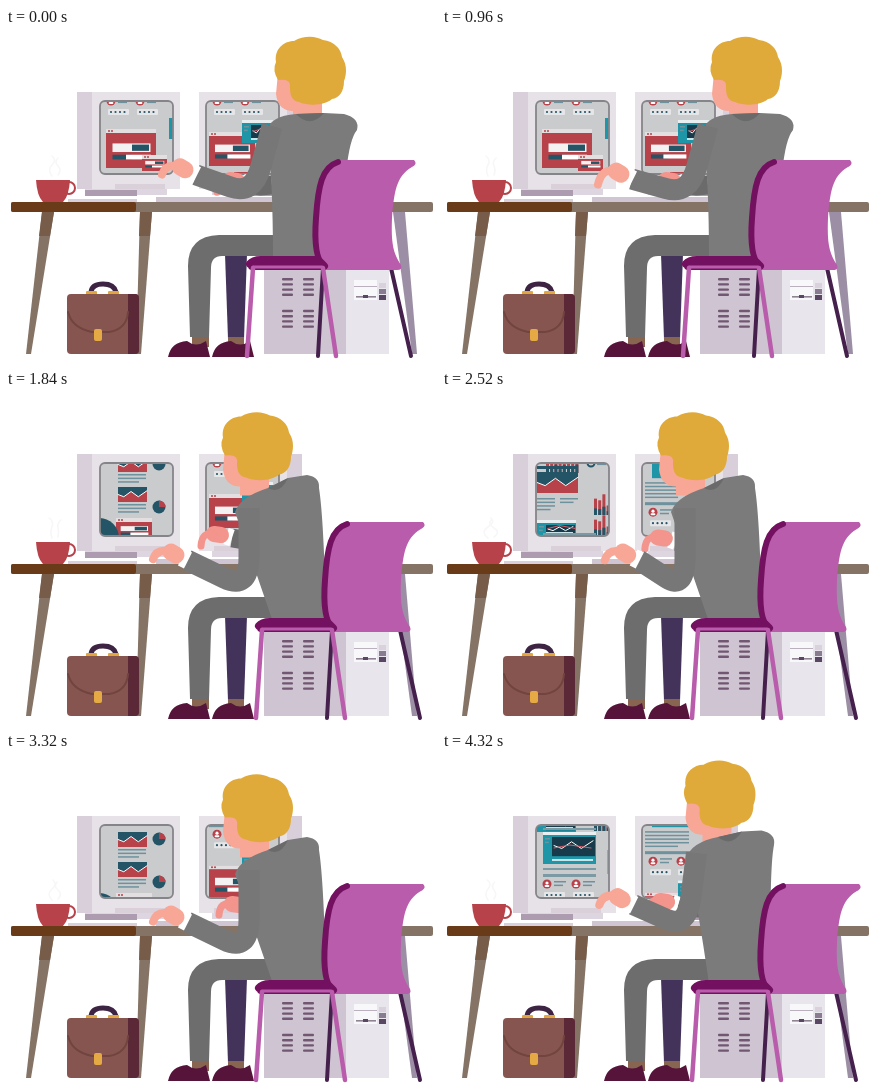
These frames come from a looping animation (430x334 px, 4.36 s). An HTML page:

```html
<!DOCTYPE html>
<html lang="en">
<head>
<meta charset="utf-8">
<title>Office worker</title>
<style>
html, body { margin: 0; width: 100%; height: 100%; overflow: hidden; background: #fff; }
svg { display: block; width: 100vw; height: 100vh; }
</style>
</head>
<body>
<svg id="stage" viewBox="0 0 430 334"></svg>
<script>
const LOOP = 4360, STEP = 40;
const LEFT_PAGE = 383, RIGHT_PAGE = 154;
const RED = '#b7424a', TEAL = '#1f96a8', NAVY = '#245567', SKIN = '#f8a696', FAR_SKIN = '#f3958c';
const PLUM = '#741060', ORCHID = '#b95cab', SUIT = '#777', WOOD = '#857465';

// ---- markup helpers ----
const rect = (x, y, w, h, fill, rx = 0) =>
  `<rect x="${x}" y="${y}" width="${w}" height="${h}" fill="${fill}" rx="${rx}"/>`;
const shape = (d, fill, id = '') => `<path id="${id}" d="${d}" fill="${fill}"/>`;
const line = (d, color, width, id = '', cap = 'round') =>
  `<path id="${id}" d="${d}" fill="none" stroke="${color}" stroke-width="${width}" stroke-linecap="${cap}" stroke-linejoin="round"/>`;
const disc = (x, y, r, fill) => `<circle cx="${x}" cy="${y}" r="${r}" fill="${fill}"/>`;
const hoop = (x, y, r, color) => `<circle cx="${x}" cy="${y}" r="${r}" fill="none" stroke="${color}" stroke-width="2"/>`;
const repeat = (n, fn) => Array.from({ length: n }, (_, i) => fn(i)).join('');
const below = (dy, content) => `<g transform="translate(0 ${dy})">${content}</g>`;
const mirrored = content => `<g transform="matrix(-1 0 0 1 367 0)">${content}</g>`;

// ---- screen widgets ----
const textLines = (x, y, w, n) => repeat(n, i => rect(x, y + i * 3.6, w - (i === n - 1 ? w / 4 : 0), 1.5, '#6e929d'));
const dots = (x, y) => rect(x - 3, y - 3, 21, 6, '#e6e6e8', 1) + repeat(4, i => disc(x + i * 4.5, y, 1.1, NAVY));
const avatar = (x, y) => disc(x, y, 4.5, RED) + disc(x, y - 1, 1.6, '#fff') +
  rect(x - 2.4, y + 1, 4.8, 2, '#fff', 1) + textLines(x + 7, y - 3, 12, 2);
const contact = (x, y) => avatar(x, y) + dots(x, y + 11);
const bars = (x, base, n) => repeat(n, i => {
  const h = 8 + 13 * Math.abs(Math.sin(i * 1.9 + .7));
  return rect(x + i * 4.2, base - h, 3, h, RED) + rect(x + i * 4.2, base - h * .4, 3, h * .4, NAVY);
});
const pie = (x, y, r) => disc(x, y, r, NAVY) + shape(`M${x} ${y}V${y - r}A${r} ${r} 0 0 1 ${x + r} ${y}Z`, RED);
const trend = (x, y, w, h) => `M${x} ${y + h * .5}l${w * .2} ${h * .15} ${w * .25} ${-h * .35} ${w * .25} ${h * .35} ${w * .3} ${-h * .4}`;
const chart = (x, y, w, h) => rect(x, y, w, h, NAVY) +
  shape(`${trend(x, y, w, h)}V${y + h}H${x}Z`, RED) + line(trend(x, y, w, h), '#fff', 1);
const darkWindow = (x, y, w, h) => rect(x, y, w, h, TEAL) + rect(x, y, w, 3, '#e9eef0') +
  rect(x + 9, y + 5, w - 10, h * .6, '#173b4a') + line(trend(x + 11, y + 4, w - 14, h * .6), '#fff', 1) +
  line(`M${x + 11} ${y + h * .5}l${w * .3} -3 ${w * .4} 3`, '#d95c68', 1) +
  textLines(x + 2, y + 6, 5, 2) + rect(x + 9, y + h - 5, w - 12, 2, '#c9e4e8');
const redWindow = (x, y, w, h) => rect(x, y, w, h, RED) + rect(x, y, w, 4, '#e3dfe1') +
  disc(x + 3, y + 2, 1, RED) + disc(x + 6, y + 2, 1, RED) +
  rect(x + w * .13, y + h * .37, w * .76, h * .22, '#f4f1f2') + rect(x + w * .52, y + h * .4, w * .34, h * .16, NAVY) +
  rect(x + w * .13, y + h * .66, w * .38, h * .12, NAVY) + rect(x + w * .4, y + h * .66, w * .5, h * .12, '#fff');
const ring = (x, y) => hoop(x, y, 3.5, NAVY) + textLines(x + 6, y - 3, 12, 2);

const report = y => chart(112, y, 29, 15) + pie(153, y + 7, 6.5) + textLines(112, y + 17, 28, 3);
const charts = report(80) + below(14, pie(153, 116, 6.5)) + chart(112, 110, 29, 15) +
  textLines(112, 127, 28, 3) + redWindow(110, 141, 36, 22) + disc(93, 161, 20, NAVY);
const statistics = disc(93, 75, 20, NAVY) + line('M93 75l14 14', RED, 2) + rect(118, 73, 49, 4, RED) + rect(118, 79, 49, 2, NAVY) +
  [123, 147].map(x => contact(x, 88) + dots(x, 107)).join('') +
  rect(119, 114, 48, 4, RED) + bars(104, 146, 8) + ring(149, 124) + ring(149, 136);
const article = rect(95, 76, 41, 3, NAVY) + chart(95, 82, 41, 21) + textLines(95, 108, 18, 4) +
  textLines(118, 108, 18, 2) + bars(152, 125, 4) + darkWindow(95, 130, 39, 17) + bars(152, 146, 4);
const dashboard = rect(101, 76, 53, 2, '#7b9aa4') + darkWindow(101, 80, 53, 32) + rect(165, 98, 3, 24, '#8badb5') +
  rect(101, 116, 53, 2, '#7b9aa4') + rect(101, 122, 53, 3, '#7b9aa4');
const forms = contact(105, 73) + contact(134, 73) + rect(163, 90, 4, 21, TEAL) +
  redWindow(100, 101, 50, 39) + redWindow(136, 127, 25, 16);

const leftPage = charts + below(120, statistics) + below(183, article) + below(250, dashboard) + below(309, forms);
const rightPage = contact(211, 0) + contact(239, 0) + redWindow(203, 31, 46, 34) + darkWindow(236, 19, 31, 23) +
  rect(228, 71, 30, 5, RED) + darkWindow(210, 82, 52, 38) + textLines(203, 124, 44, 5) + rect(203, 144, 52, 3, '#6e929d');

// ---- furniture ----
const screen = (id, page, height) => `<g clip-path="url(#${id}Glass)"><g id="${id}">${page}${below(height, page)}</g></g>`;
const glass = (id, x) => `<clipPath id="${id}Glass">${rect(x, 73, 73, 73, '#000', 5)}</clipPath>`;
const monitorBody = rect(71, 64, 103, 97, '#e7e2e8') + rect(71, 64, 15, 97, '#d9cfdb') +
  rect(79, 161, 82, 6, '#ddd5df') + rect(79, 162, 52, 6, '#ad9cb0') + rect(109, 156, 50, 5, '#d9d0da') +
  rect(94, 73, 73, 73, '#cacbcd', 5);
const bezel = `<rect x="94" y="73" width="73" height="73" rx="5" fill="none" stroke="#858589" stroke-width="1.8"/>`;
const monitors = monitorBody + mirrored(monitorBody) +
  screen('left', leftPage, LEFT_PAGE) + screen('right', rightPage, RIGHT_PAGE) + bezel + mirrored(bezel);

const vents = repeat(16, i => rect(276 + i % 2 * 21, 250 + (i >> 1) * 5.2 + (i > 7 ? 11 : 0), 11, 2.4, '#725772', 1));
const tower = rect(258, 240, 83, 86, '#cfc4d1') + rect(340, 240, 43, 86, '#e9e5ec') + vents +
  rect(348, 252, 23, 20, '#f8f7f9') + rect(348, 258, 23, 1, '#bbb1be') + rect(350, 268, 20, 1.6, '#8f8393') +
  rect(357, 267, 5, 3, '#594662') + repeat(3, i => rect(373, 255 + i * 6, 7, 5, ['#d9d1dc', '#8a7c90', '#594662'][i]));

const deskLeg = (x, foot, color) => shape(`M${x} 184H${x + 12}L${foot + 5} 326H${foot}Z`, color);
const desk = deskLeg(36, 20, WOOD) + deskLeg(134, 130, WOOD) + deskLeg(387, 406, '#9c8fa5') +
  shape('M36 184H48L44 208H33Z', '#765c49') + shape('M134 184H146L144 208H133Z', '#765c49') +
  rect(5, 174, 422, 10, WOOD, 2) + rect(5, 174, 125, 10, '#6a3b19', 2) +
  rect(62, 171, 69, 3, '#d8d0dc') + rect(150, 169, 116, 5, '#d0c5d3');

const briefcase = line('M85 264Q86 256 97 256T110 264', '#3e2443', 5) +
  rect(80, 263, 11, 4, '#e2a640', 1) + rect(102, 263, 11, 4, '#e2a640', 1) +
  rect(61, 266, 72, 60, '#875550', 4) + shape('M122 266H129Q133 266 133 270V322Q133 326 129 326H122Z', '#5b2838') +
  line('M62 284Q66 300 86 304H103Q121 301 122 284', '#71443f', 2) + rect(88, 301, 8, 12, '#e5aa43', 2);

const cup = hoop(63, 160, 6, RED) + shape('M30 152H64Q63 168 57 174H37Q31 168 30 152Z', RED) + line('', '#f7f7f7', 1.6, 'steam');

const shoe = x => shape(`M${x} 329Q${x + 3} 314 ${x + 19} 313Q${x + 28} 320 ${x + 38} 313L${x + 42} 329Z`, '#57143a');
const legs = shape('M219 226H241L238 311H222Z', '#43335a') + rect(222, 309, 16, 12, '#876551') +
  rect(186, 307, 17, 12, '#876551') +
  shape('M270 207H213Q182 208 182 238L184 309H203L205 240Q205 228 216 228H270Z', '#6d6d6d') + shoe(162) + shoe(206);

const head = shape('M272 45L270 66Q272 83 287 83V92H316V60Z', SKIN) +
  shape('M272 52Q266 42 270 34C268 22 277 13 288 13C298 7 310 8 317 12C328 13 335 21 336 29C342 38 340 48 338 53C338 64 333 70 326 71C318 78 302 78 293 74Q284 73 284 60Q286 50 272 52Z', '#dfaa3a');

const seat = `<g id="seat">` +
  shape('M331 132H408Q412 136 406 139C390 148 388 165 386 190C385 215 387 225 395 237Q397 242 391 242H318C306 232 308 165 316 147Q321 134 331 132Z', ORCHID) +
  line('M332 134C316 139 312 158 310 190Q307 229 318 239', PLUM, 6) +
  line('M244 236Q247 232 255 232H312L318 238H246', PLUM, 8) + line('M247 239H316', ORCHID, 3) + `</g>`;

document.getElementById('stage').innerHTML =
  `<defs>${glass('left', 94)}${glass('right', 200)}</defs>` + rect(0, 0, 430, 334, '#fff') +
  monitors + desk + tower + briefcase + cup +
  line('', '#6b6b6b', 19, 'farSleeve', 'butt') + line('', '#fff', 17, 'farCuff', 'butt') +
  line('', FAR_SKIN, 16, 'farPalm') + line('', FAR_SKIN, 7, 'farFinger') +
  legs + line('', '#46204d', 4, 'backLegs') +
  `<g id="head">${head}</g>` + shape('', '#7b7b7b', 'torso') + shape('', '#6a6a6a', 'collar') +
  line('', SUIT, 21, 'sleeve', 'butt') + line('', '#fff', 18, 'cuff', 'butt') +
  line('', SKIN, 17, 'palm') + line('', SKIN, 8, 'finger') +
  seat + line('', ORCHID, 4.5, 'frontLegs');

// ---- motion ----
const $ = id => document.getElementById(id);
const set = (id, d) => $(id).setAttribute('d', d);
const move = (id, x, y) => $(id).setAttribute('transform', `translate(${x} ${y})`);
const poly = (...pts) => 'M' + pts.map(p => p.join(' ')).join('L');
const ramp = (t, from, to) => Math.min(1, Math.max(0, (t - from) / (to - from)));
const smooth = u => u * u * (3 - 2 * u);
const between = (a, b, u) => [a[0] + (b[0] - a[0]) * u, a[1] + (b[1] - a[1]) * u];
const arch = u => Math.sin(Math.PI * u);
const swing = (t, period) => -Math.cos(2 * Math.PI * (t - 1840) / period);

function drawScreens(t) {
  move('left', 0, -((309 + .25 * Math.max(0, t - 1492)) % LEFT_PAGE));
  move('right', 0, -((RIGHT_PAGE - 73 + .435 * Math.max(0, t - 1925)) % RIGHT_PAGE));
}

function drawBody(lean, lift, t) {
  const joint = (x, y, dx, dy) => [x + dx * lean, y + dy * lean - lift];
  const shoulder = joint(261, 103, -32, 19), nape = joint(290, 86, -28, 12);
  const collar = joint(318, 85, -36, 3), outer = joint(351, 102, -38, -4);
  move('head', -53 * lean, 13.5 * lean - lift);
  set('torso', `M267 232Q${joint(267, 150, -23, 15)} ${shoulder}Q${joint(264, 88, -30, 19)} ${nape}L${collar}` +
    `L${joint(338, 86, -37, -1)}Q${joint(354, 90, -40, -3)} ${outer}Q${joint(336, 120, -18, 10)} ${338 - 18 * lean} 232Z`);
  set('collar', `M${nape}Q${joint(304, 101, -30, 4)} ${collar}Z`);

  const reach = swing(t, 1480);
  const wrist = joint(190 + reach * 8 * lean, 147 + reach * 5 * (1 - lean), -1, 23);
  const [x, y] = wrist, palm = [x - 16, y - 8];
  const tip = [x - 34, y + reach * 6 * (1 - lean) + Math.sin(t / 50)];
  const elbow = joint(247, 167, -4, 33), top = joint(266, 98, -23, 20);
  set('sleeve', `M${top}L${between(elbow, top, .4)}Q${elbow} ${between(elbow, wrist, .4)}L${wrist}`);
  set('cuff', poly([x + 1, y + .5], [x - 5, y - 2.5]));
  set('palm', poly([x - 11, y - 5], palm));
  set('finger', `M${palm}Q${tip[0] + 4} ${palm[1] - 4} ${tip}`);
}

function drawFarArm(lean, t) {
  const drift = swing(t, 2960) * lean;
  const x = 224 - 7 * lean + 9 * drift, y = 152 - 4 * lean + 4 * drift;
  const tap = 12 - 8 * swing(t, 1480) * (1 - lean) + Math.sin(t / 45);
  set('farSleeve', poly([x + 18, y + 4], [x + 30, y + 6], [266, 157]));
  set('farCuff', poly([x + 12, y + 2], [x + 18, y + 4]));
  set('farPalm', poly([x + 7, y + 1], [x, y]));
  set('farFinger', `M${x} ${y}Q${x - 12} ${y - 3} ${x - 13} ${y + tap}`);
}

function drawChair(pushed) {
  const shift = 9 * pushed;
  const leg = (x, foot) => poly([x + shift, 240], [foot + shift, 328]);
  move('seat', shift, 0);
  set('backLegs', leg(317, 312) + leg(385, 405));
  set('frontLegs', leg(247, 241) + leg(317, 330));
}

function render(now) {
  const t = Math.floor(now % LOOP / STEP) * STEP;
  const sitDown = smooth(ramp(t, 1480, 1840)), sitUp = ramp(t, 4260, 4380);
  const lean = sitDown - sitUp;
  drawScreens(t);
  drawBody(lean, 14 * arch(sitDown) + 7 * arch(sitUp), t);
  drawFarArm(lean, t);
  drawChair(t >= 1760 ? 1 : 0);
  const sway = 3 * Math.sin(t / LOOP * Math.PI * 8);
  set('steam', `M46 148q${-5 - sway} -6 0 -11t${sway} -9M52 147q${4 + sway} -5 0 -9t${-sway} -8`);
}

const start = performance.now();
function loop() {
  render(performance.now() - start);
  requestAnimationFrame(loop);
}
loop();
</script>
</body>
</html>
```
